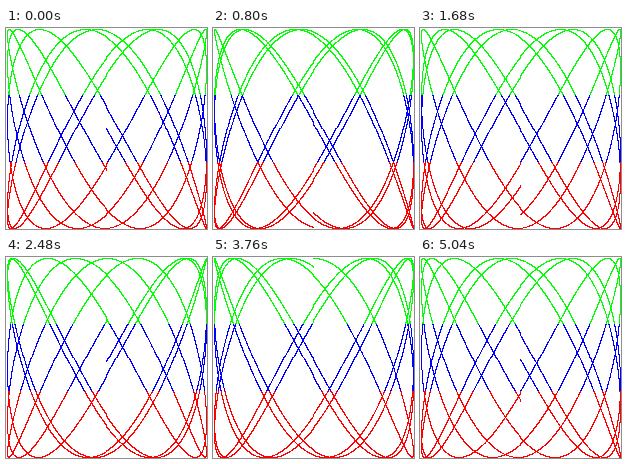
Recreate the animation shown at these times as an HTML page with a canvas. Size 201x201 px, loop 5120 ms.

```html
<!DOCTYPE html>
<html lang="en">
<head>
<meta charset="utf-8">
<title>Lissajous</title>
<style>
  html, body { margin: 0; height: 100%; overflow: hidden; background: #fff; }
  canvas { display: block; }
</style>
</head>
<body>
<canvas id="stage" width="201" height="201"></canvas>
<script>
const SIZE = 100, SIDE = 2 * SIZE + 1;
const CYCLES = 5, RES = 0.001, FREQ = 1.8139808639388589;
const STEPS = 64, DELAY = 80, PHASE_STEP = 0.1;

// Pixels as 0xAABBGGRR
const WHITE = 0xffffffff, GREEN = 0xff00ff00, BLUE = 0xffff0000, RED = 0xff0000ff;
const BANDS = [GREEN, BLUE, RED];

const ctx = document.getElementById('stage').getContext('2d');
const image = ctx.createImageData(SIDE, SIDE);
const pixels = new Uint32Array(image.data.buffer);

// Truncation (not flooring) keeps the curve inside 1..200
const toPixel = v => SIZE + Math.trunc(v * SIZE + 0.5);

function draw(phase) {
  pixels.fill(WHITE);
  for (let t = 0; t < CYCLES * 2 * Math.PI; t += RES) {
    const x = toPixel(Math.sin(t));
    const y = toPixel(Math.sin(t * FREQ + phase));
    pixels[y * SIDE + x] = BANDS[Math.floor(y * 3 / SIDE)];
  }
  ctx.putImageData(image, 0, 0);
}

let shown = -1;
const start = performance.now();

function tick() {
  const elapsed = Math.max(0, performance.now() - start);
  const step = Math.floor(elapsed / DELAY) % STEPS;
  if (step !== shown) {
    shown = step;
    draw(step * PHASE_STEP);
  }
  requestAnimationFrame(tick);
}
tick();
</script>
</body>
</html>
```
